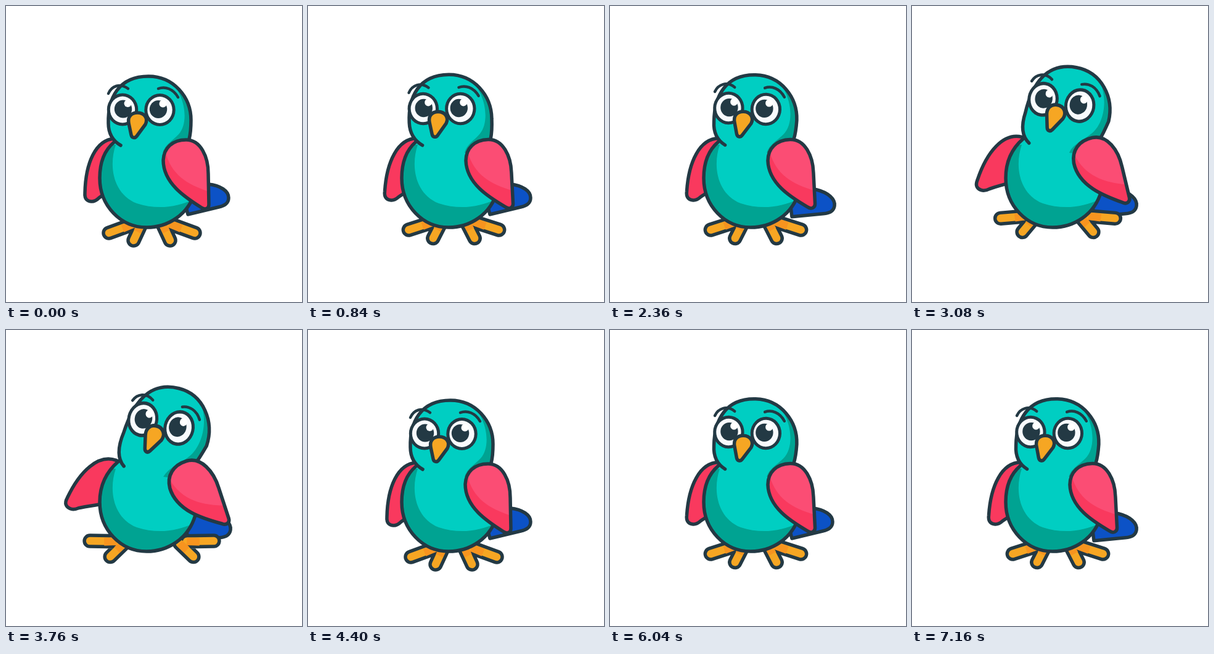
Animation of 480 by 480 pixels, one loop 7.2 s. Source, as an HTML page with a canvas:

```html
<!DOCTYPE html>
<html>
<head>
<meta charset="utf-8">
<style>
  html, body { margin: 0; width: 100%; height: 100%; overflow: hidden; background: #fff; }
  canvas { display: block; width: 480px; height: 480px; }
</style>
</head>
<body>
<canvas id="stage" width="480" height="480"></canvas>
<script>
const c = document.getElementById('stage').getContext('2d');
const INK = '#233944', TEAL = '#00cec2', DEEP = '#00a392', BLUE = '#0c52c6';
const PINK = '#fb4d74', RED = '#f9395e', GOLD = '#f6a623', AMBER = '#f7941f';
const STEP = 40, BEAT = 400;
const FACE_X = 219, FACE_Y = 168, MIDDLE = 236.5;

const BODY = 'M186 226C172 218 166 206 166 190C165 150 182 114 231 114C272 114 300 148 300 185'
  + 'C300 200 299 208 297 216C311 240 313 275 307 300C296 339 262 359 228 359C186 359 152 324 152 279C152 250 162 232 175 221';
const NECK_SHADE = 'M262 118C290 140 298 188 280 208C270 219 258 224 254 238L340 250L340 90Z';
const BELLY_SHADE = new Path2D('M178 225C166 260 174 305 212 320C245 331 278 326 303 314L330 370H140V225Z');
const WING_L = new Path2D('M176 215C145 217 129 255 128 303C127 314 133 317 139 317C144 317 148 314 151 311C160 304 175 295 190 285V215Z');
const WING_R = new Path2D('M292 217C316 217 328 245 328 272L329 322C329 329 322 331 317 327C290 310 255 287 255 250C256 230 270 217 292 217Z');
const WING_SHADE = new Path2D('M258 235C268 275 295 290 332 302V340H240V235Z');
const TAIL = new Path2D('M285 300L328 289C348 291 361 300 361 311C361 321 353 324 345 326L295 338Z');
const BEAK = new Path2D('M213 173C224 173 231 182 226 192L212 211C209 215 204 214 203 209L199 190C197 180 203 173 213 173Z');
const BROWS = new Path2D('M166 142C171 130 185 124 198 134M247 134C258 130 271 134 279 148');
const TOES = new Path2D('M167 368L208 353M220 352L207 380');
const TOE_SHADE = new Path2D('M208 353L189 361M220 352L213 366');

function turned(degrees, px, py, dx, dy, draw, sx = 1, sy = 1) {
  c.save();
  c.translate(px + dx, py + dy);
  c.rotate(degrees * Math.PI / 180);
  c.scale(sx, sy);
  c.translate(-px, -py);
  draw();
  c.restore();
}

// The head follows the face; the pull fades out down the neck.
function bent(d, pose) {
  return new Path2D(d.replace(/(\d+) (\d+)/g, (_, x, y) => {
    const w = Math.max(0, Math.min(1.1, (242 - y) / 58));
    const a = pose.tilt * w * Math.PI / 180, cos = Math.cos(a), sin = Math.sin(a);
    const u = x - FACE_X, v = (y - FACE_Y) * (1 + (pose.stretch - 1) * w);
    return [FACE_X + pose.dx * w + u * cos - v * sin, FACE_Y + pose.dy * w + u * sin + v * cos].join(' ');
  }));
}

function line(path, width, color) {
  c.lineWidth = width;
  c.strokeStyle = color;
  c.stroke(path);
}

function shape(path, fill, shades = [], shadeColor) {
  c.fillStyle = fill;
  c.fill(path);
  c.save();
  c.clip(path);
  c.fillStyle = shadeColor;
  for (const part of shades) c.fill(part);
  c.restore();
  line(path, 5.5, INK);
}

function oval(x, y, rx, ry, fill) {
  c.fillStyle = fill;
  c.beginPath();
  c.ellipse(x, y, rx, ry, 0, 0, 7);
  c.fill();
}

function eye(x, y, look) {
  oval(x, y, 25.2, 26.5, INK);
  oval(x, y, 20.2, 21.5, '#f8fafd');
  oval(x + look, y - 1, 14.2, 14.5, INK);
  oval(x + look + 7.5, y - 10, 6, 6, '#fff');
}

function face() {
  eye(189, 168, 1);
  eye(249.5, 168.5, -2.5);
  shape(BEAK, GOLD);
}

function foot() {
  line(TOES, 23.5, INK);
  line(TOES, 12.5, GOLD);
  c.lineCap = 'butt';
  line(TOE_SHADE, 12.5, AMBER);
  c.lineCap = 'round';
}

function feet(k) {
  const hop = -Math.max(0, 30 * k * (1 - k));
  for (const flip of [1, -1]) {
    turned(0, MIDDLE, 0, 0, 0, () => turned(21 * k, 221.5, 271.6, 0, hop, foot), flip);
  }
}

function draw(time) {
  const t = Math.floor(time / STEP) * STEP;
  const phase = t % BEAT;
  const k = 0.5525 * (1 - Math.cos(2 * Math.PI * phase / BEAT));
  const leftward = t % (2 * BEAT) < BEAT;
  const pose = { dx: (leftward ? -21 : 32) * k, dy: -16.5 * k, tilt: (leftward ? -5 : 13) * k, stretch: 1 + 0.1 * k };
  const drop = phase >= 80 ? 1 : 0;
  const grow = 1 + 0.04 * k;

  c.clearRect(0, 0, 480, 480);
  c.lineCap = c.lineJoin = 'round';
  turned(8 * drop, 290, 338, 0, 3 * drop, () => shape(TAIL, BLUE));
  turned(24 * k, 175, 215, 3 * k, -4 * k, () => shape(WING_L, RED));
  feet(k);
  shape(bent(BODY, pose), TEAL, [BELLY_SHADE, bent(NECK_SHADE, pose)], DEEP);
  turned(pose.tilt, FACE_X, FACE_Y, pose.dx, pose.dy, face, 1, pose.stretch);
  turned(pose.tilt, FACE_X, FACE_Y, pose.dx, pose.dy, () => line(BROWS, 4.5, INK));
  turned(-17 * k, 290, 235, 6 * k, -4 * k, () => shape(WING_R, PINK, [WING_SHADE], RED), grow, grow);
}

function tick() {
  draw(performance.now() % 7200);
  requestAnimationFrame(tick);
}
tick();
</script>
</body>
</html>
```
